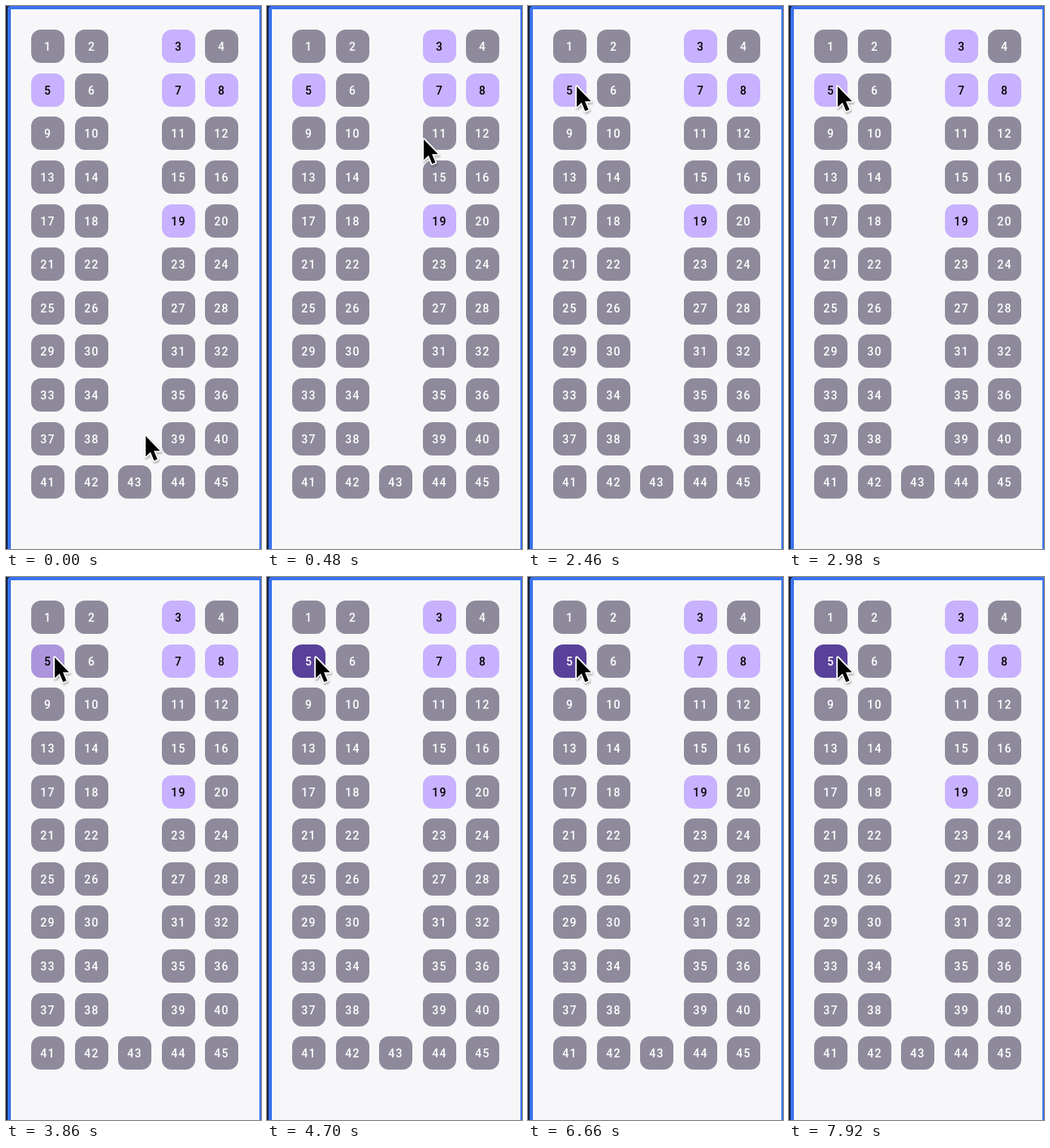
An HTML page that plays this animation: 314 by 668 pixels, repeating every 8000 ms.

```html
<!DOCTYPE html>
<html lang="en">
<head>
<meta charset="utf-8">
<title>Seat picker</title>
<style>
  html, body { margin: 0; width: 100%; height: 100%; overflow: hidden; background: #f7f7f9; }
  #stage { position: relative; width: 314px; height: 668px; overflow: hidden; background: #14203c; }
  #panel {
    position: absolute; left: 2px; top: 0; width: 314px; height: 680px; box-sizing: border-box;
    border: 4px solid #3a72f0; border-radius: 4px; background: #f7f7f9;
  }
  .seat {
    position: absolute; width: 41px; height: 41px; border-radius: 12px;
    background: #8f8a9b; color: #fff; text-align: center;
    font: 500 14px/42px Roboto, sans-serif; letter-spacing: 1.25px;
  }
  .taken { background: #c8b1ff; color: #000; }
  #cursor { position: absolute; left: 0; top: 0; overflow: visible; filter: drop-shadow(1px 2px 1px #0004); }
</style>
</head>
<body>
<div id="stage">
  <div id="panel"></div>
  <svg id="cursor" width="24" height="38">
    <path d="M1 3V28.2L7 22.8L11.3 33.2L15.4 31.4L11.1 21.3H18.6Z"
      fill="#000" stroke="#fff" stroke-width="3.5" stroke-linejoin="round" paint-order="stroke"/>
  </svg>
</div>
<script>
const LOOP = 8000;
const PITCH = 53.6;
const taken = new Set([3, 5, 7, 8, 19]);
const stage = document.getElementById('stage');
const cursor = document.getElementById('cursor');
const seats = {};

function addSeat(number, column, row) {
  const seat = document.createElement('div');
  seat.className = taken.has(number) ? 'seat taken' : 'seat';
  seat.textContent = number;
  seat.style.left = Math.round(31 + column * PITCH) + 'px';
  seat.style.top = Math.round(29.2 + row * PITCH) + 'px';
  stage.insertBefore(seat, cursor);
  seats[number] = seat;
}

// Ten rows with an aisle, then a full back row.
for (let i = 0; i < 40; i++) addSeat(i + 1, [0, 1, 3, 4][i % 4], Math.floor(i / 4));
for (let i = 0; i < 5; i++) addSeat(41 + i, i, 10);

function play(element, steps) {
  const frames = steps.map(([time, style, easing = 'linear']) =>
    ({ offset: time / LOOP, easing, ...style }));
  element.animate(frames, { duration: LOOP, iterations: Infinity });
}

const at = (x, y) => ({ transform: `translate(${x}px, ${y}px)` });
play(cursor, [
  [0, at(171, 526), 'ease-out'],
  [300, at(192, 161)],
  [480, at(192, 161), 'ease'],
  [1720, at(78, 97), 'ease-out'],
  [2140, at(59, 96)],
  [LOOP, at(59, 96)],
]);

const free = { backgroundColor: '#c8b1ff', color: '#000' };
const fading = { backgroundColor: '#ac95dc', color: '#000' };
const chosen = { backgroundColor: '#59409a', color: '#fff' };
play(seats[5], [
  [0, free],
  [3820, free],
  [3860, fading],
  [3960, fading, 'ease-out'],
  [4120, chosen],
  [LOOP, chosen],
]);
</script>
</body>
</html>
```
